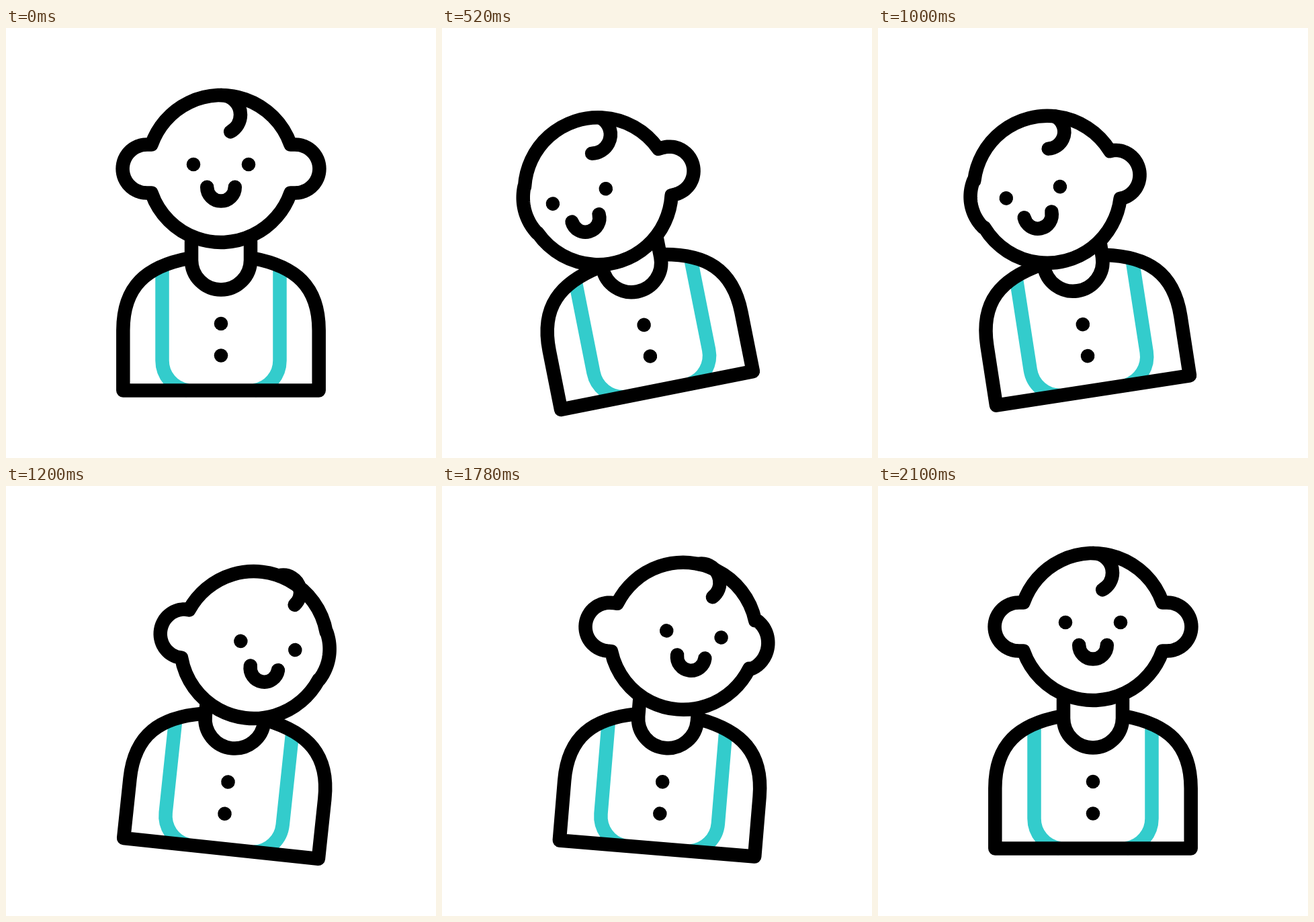
An HTML page with a canvas that plays this animation: 640x640 px, repeating every 2400 ms.

```html
<!DOCTYPE html>
<html lang="en">
<head>
<meta charset="utf-8">
<title>Swaying child</title>
<style>
html, body { margin: 0; width: 100%; height: 100%; overflow: hidden; background: #fff; }
canvas { display: block; }
</style>
</head>
<body>
<canvas id="stage" width="640" height="640"></canvas>
<script>
const ctx = document.getElementById('stage').getContext('2d');
const { PI, cos, sin, hypot, atan2 } = Math;
const rad = deg => deg * PI / 180;
const LOOP = 2400, LINE = 20.5, FACE = 109.5;
const KINK = rad(19.2); // half angle an ear takes on the face circle

// body angle, head x, y, angle, face x, y, ear sizes, curl direction and centre
const pose = (body, hx, hy, head, fx, fy, earL, earR, curl, cx, cy) =>
  [body, hx, hy, head, fx, fy, earL, earR, cos(rad(curl)), sin(rad(curl)), cx, cy];
const rest = pose(0, 0, 0, 0, 0, 0, 1, 1, 0, 0, -80.5);
const left = pose(-12.4, -31, 24, -5, -32, 7, 0, 1, 48, 15, -84);
const right = pose(9.6, 25.8, 23.5, 4.7, 31, 3.5, 1, -.07, -33, 33.5, -84.5);
const keys = [[0, rest], [740, left], [1460, right], [2100, rest], [LOOP, rest]];

// cubic-bezier(.71, 0, .29, 1)
function ease(x) {
  let lo = 0, hi = 1, s;
  for (let i = 0; i < 30; i++) {
    s = (lo + hi) / 2;
    const bx = 2.13 * s * (1 - s) ** 2 + .87 * s * s * (1 - s) + s ** 3;
    if (bx < x) lo = s; else hi = s;
  }
  return s * s * (3 - 2 * s);
}

function poseAt(t) {
  const i = keys.findIndex((k, n) => t < keys[n + 1][0]);
  const [t0, a] = keys[i], [t1, b] = keys[i + 1];
  const p = ease((t - t0) / (t1 - t0));
  return a.map((v, n) => v + (b[n] - v) * p);
}

function stroke(build, color = '#000', cap = 'round') {
  ctx.beginPath();
  build();
  ctx.strokeStyle = color;
  ctx.lineCap = cap;
  ctx.stroke();
}

function dot(x, y) {
  ctx.beginPath();
  ctx.arc(x, y, 10.3, 0, 2 * PI);
  ctx.fillStyle = '#000';
  ctx.fill();
}

// Body space: origin in the middle of the bottom edge
function drawBody() {
  for (const side of [-1, 1]) {
    ctx.save();
    ctx.scale(side, 1);
    stroke(() => {
      ctx.moveTo(87.5, -185);
      ctx.lineTo(87.5, -44.5);
      ctx.arc(42.5, -44.5, 45, 0, PI * .45);
    }, '#33cccc', 'butt');
    ctx.restore();
  }
  stroke(() => {
    ctx.moveTo(-48, -196.8);
    ctx.bezierCurveTo(-110, -185, -145.7, -156, -145.7, -89.5);
    ctx.lineTo(-145.7, 0);
    ctx.lineTo(145.7, 0);
    ctx.lineTo(145.7, -89.5);
    ctx.bezierCurveTo(145.7, -156, 110, -185, 48, -196.8);
  });
  stroke(() => {
    ctx.moveTo(44, -222);
    ctx.arc(0, -194, 44, 0, PI);
    ctx.lineTo(-44, -222);
  });
  dot(0, -99.5);
  dot(0, -52);
}

// Blends from the plain face arc (size 0) to the full round ear (size 1)
function ear(side, size) {
  const x = FACE * cos(KINK), h = FACE * sin(KINK);
  const mix = (a, b) => side * (a + (b - a) * size);
  ctx.lineTo(side * x, -side * h);
  for (let u = -1; u <= 1; u += 1 / 16) {
    const arc = u * KINK, round = u * PI / 2;
    ctx.lineTo(mix(FACE * cos(arc), x + 7 + h * cos(round)),
               mix(FACE * sin(arc), h * sin(round)));
  }
  ctx.lineTo(side * x, side * h);
}

// Head space: origin in the centre of the face
function drawHead(fx, fy, earL, earR, ca, sa, cx, cy) {
  ctx.beginPath();
  ctx.arc(0, 0, FACE, PI + KINK, -KINK);
  ear(1, earR);
  ctx.arc(0, 0, FACE, KINK, PI - KINK);
  ear(-1, earL);
  ctx.closePath();
  ctx.fillStyle = '#fff';
  ctx.fill();
  ctx.strokeStyle = '#000';
  ctx.stroke();

  const turn = atan2(sa, ca);
  stroke(() => ctx.arc(cx, cy, 29 * hypot(ca, sa), turn - PI / 2, turn + rad(61)));
  dot(fx - 41, fy - 6.5);
  dot(fx + 41, fy - 6.5);
  stroke(() => ctx.arc(fx, fy + 27.3, 20.8, 0, PI));
}

function draw(t) {
  const [body, hx, hy, head, ...face] = poseAt(t);
  ctx.setTransform(1, 0, 0, 1, 0, 0);
  ctx.fillStyle = '#fff';
  ctx.fillRect(0, 0, 640, 640);
  ctx.lineWidth = LINE;
  ctx.lineJoin = 'round';
  ctx.translate(320, 539.5);
  ctx.rotate(rad(body));
  drawBody();
  ctx.translate(hx, hy - 330);
  ctx.rotate(rad(head));
  drawHead(...face);
}

const start = performance.now();
function tick() {
  draw((performance.now() - start) % LOOP);
  requestAnimationFrame(tick);
}
tick();
</script>
</body>
</html>
```
